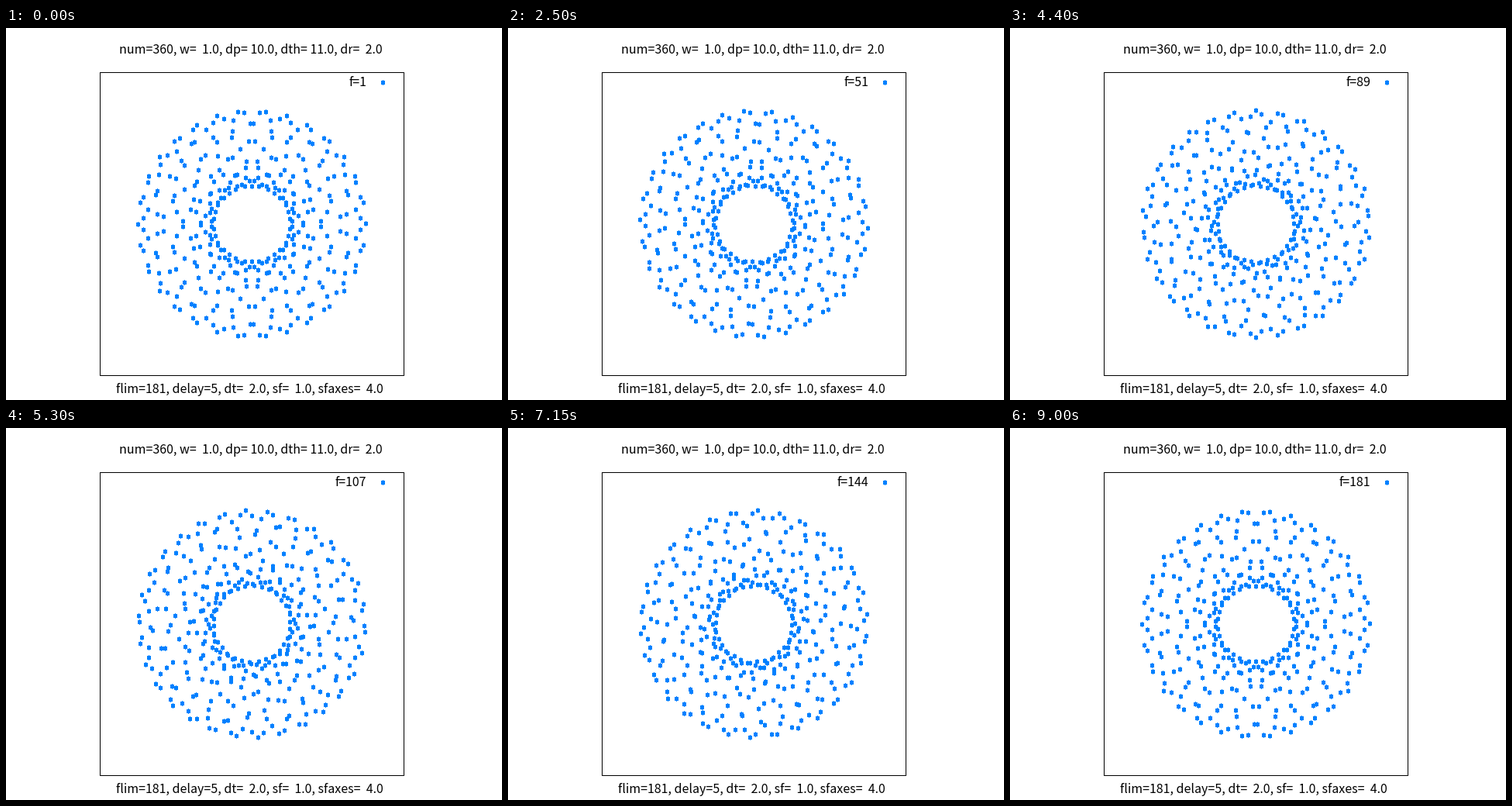
These frames come from a looping animation (640 px wide and 480 px high, 9.05 s). A matplotlib script:

```python
import numpy as np
import matplotlib.pyplot as plt
from matplotlib.animation import FuncAnimation
from matplotlib.collections import PolyCollection
from matplotlib.patches import Rectangle

W, H, DPI = 640, 480, 100
PX = 72 / DPI                      # one pixel in points
BLUE = "#0080ff"
NUM, W_RATE, DP, DTH, DR = 360, 1.0, 10.0, 11.0, 2.0
FLIM, DELAY, DT, SF, AXES = 181, 5, 2.0, 1.0, 4.0
LEFT, TOP, BOX_W, BOX_H = 121, 57, 392, 391

plt.rcParams["text.kerning_factor"] = 6    # whole-pixel kerning
fig = plt.figure(figsize=(W / DPI, H / DPI), dpi=DPI, facecolor="white")
ax = fig.add_axes([0, 0, 1, 1])
ax.set(xlim=(0, W), ylim=(H, 0))
ax.axis("off")


def dot_outline(body=2.5, nub=0.5, reach=3.5):
    """A small square with a one-pixel nub above and below."""
    right = np.array([(nub, -reach), (nub, -body), (body, -body),
                      (body, body), (nub, body), (nub, reach)])
    return np.vstack([right, right[::-1] * (-1, 1)]) + 0.5


DOT = dot_outline()


def dots(centres):
    return np.asarray(centres)[:, None, :] + DOT


def positions(frame):
    i = np.arange(NUM)
    radius = DR + SF * np.cos(np.radians(W_RATE * DT * frame + DP * i))
    theta = np.radians(DTH * i)
    x = LEFT + BOX_W * (0.5 + radius * np.cos(theta) / (2 * AXES))
    y = H - 1 - TOP - BOX_H * (0.5 - radius * np.sin(theta) / (2 * AXES))
    return np.column_stack([np.floor(x + 0.5), H - 1 - np.floor(y + 0.5)])


def label(x, y, text, **kw):
    return ax.text(x, y, text, family="Noto Sans CJK JP", fontsize=16 * PX,
                   color="black", va="baseline", **kw)


def block(inset, color):
    ax.add_patch(Rectangle((LEFT + inset, TOP + inset),
                           BOX_W + 1 - 2 * inset, BOX_H + 1 - 2 * inset,
                           facecolor=color, linewidth=0, antialiased=False))


block(0, "black")
block(1, "white")

label(316, 33, f"num={NUM}, w={W_RATE:5.1f}, dp={DP:5.1f}, dth={DTH:5.1f}, "
      f"dr={DR:5.1f}", ha="center")
label(314.5, 471, f"flim={FLIM}, delay={DELAY}, dt={DT:5.1f}, sf={SF:5.1f}, "
      f"sfaxes={AXES:5.1f}", ha="center")
counter = label(465, 75, "", ha="right")

style = dict(facecolors=BLUE, edgecolors="none", linewidths=0,
             antialiaseds=False, zorder=2)
ax.add_collection(PolyCollection(dots([(486, 70)]), **style), autolim=False)
cloud = PolyCollection(dots(positions(0)), **style)
ax.add_collection(cloud, autolim=False)


def update(frame):
    cloud.set_verts(dots(positions(frame)))
    counter.set_text(f"f={frame + 1}")
    return cloud, counter


anim = FuncAnimation(fig, update, frames=FLIM, interval=DELAY * 10,
                     repeat=True, repeat_delay=0)
plt.show()
```
